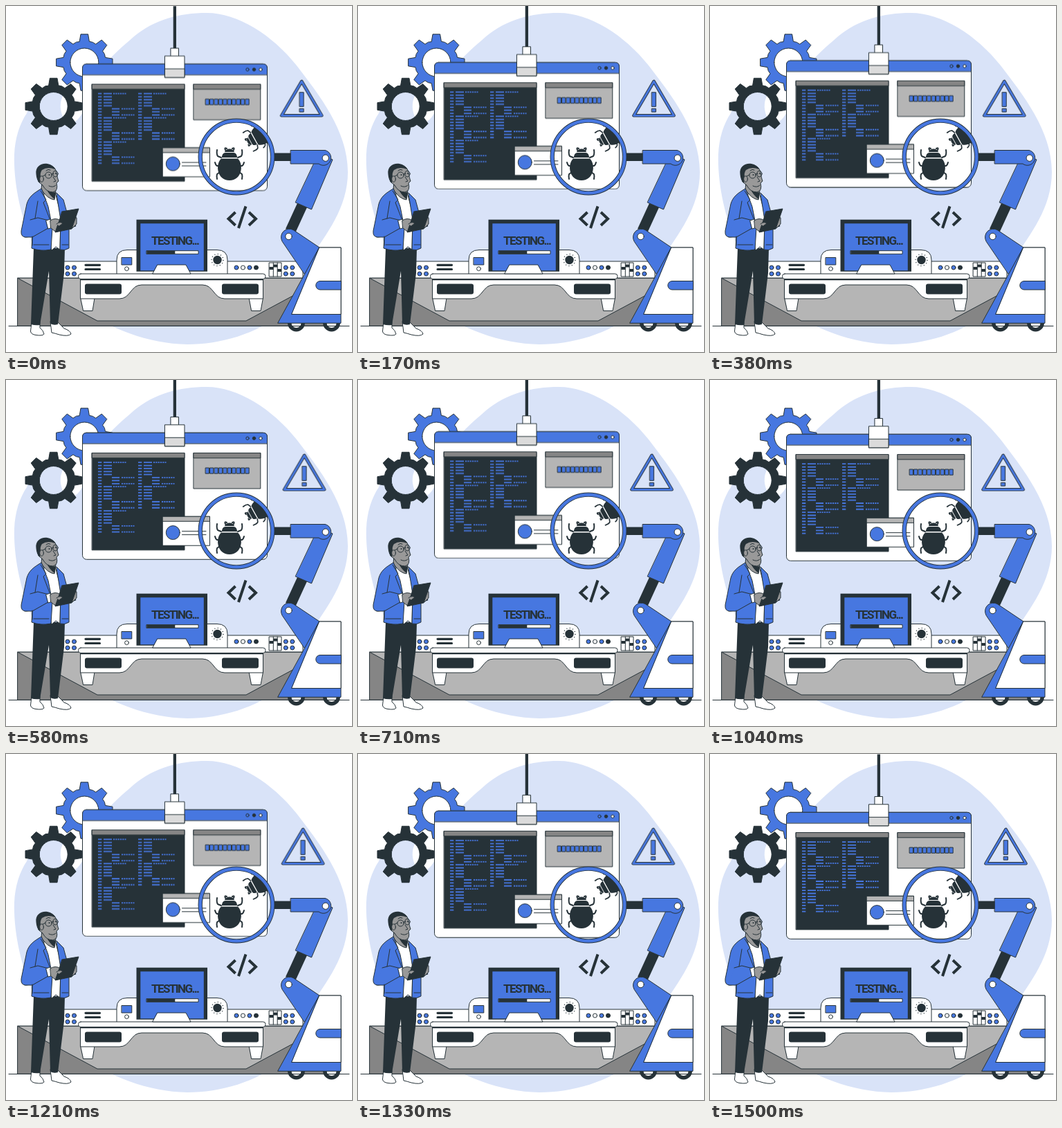
Recreate the animation shown at these times as an HTML page. Size 500 by 500 pixels, loop 1.54 s.

```html
<!DOCTYPE html>
<html lang="en">
<head>
<meta charset="utf-8">
<title>Testing</title>
<style>
html, body { margin: 0; width: 100%; height: 100%; overflow: hidden; background: #fff; }
svg { display: block; width: 100vw; height: 100vh; }
.o { stroke: #263238; stroke-width: 1; stroke-linejoin: round; stroke-linecap: round; }
.b { fill: #4777e0; }
.d { fill: #263238; }
.w { fill: #fff; }
.g { fill: #b5b5b5; }
.m { fill: #858585; }
.n { fill: none; }
.sky { fill: #d9e3f8; }
.skin { fill: #999; }
.leg { fill: none; stroke: #263238; stroke-width: 2; stroke-linecap: round; stroke-linejoin: round; }
.title { font: 700 17px Roboto, sans-serif; letter-spacing: -1.6px; }
</style>
</head>
<body>
<svg viewBox="0 0 500 500" xmlns="http://www.w3.org/2000/svg">
  <defs>
    <clipPath id="lens"><circle cx="333" cy="218" r="50"/></clipPath>
    <g id="bug">
      <path class="leg" d="M-6-24Q-8-28-4-26M6-24Q8-28 4-26M-12-13L-17-15Q-19-18-18-24M12-13L17-15Q19-18 18-24M-15-1H-18Q-20-2-21-6M15-1H18Q20-2 21-6M-14 8L-18 11Q-19 14-18 18M14 8L18 11Q19 14 18 18"/>
      <path class="d" d="M-7-21C-6-27 6-27 7-21ZM-11-13C-11-17-9-20-6-20H6C9-20 11-17 11-13ZM-12-11.500H12C21-3 18 20 0 20C-18 20-21-3-12-11.500Z"/>
    </g>
  </defs>

  <path class="sky" d="M12 215C13 190 20 170 30 155C40 130 55 119 68 119Q82 118 83 128Q74 145 84 164Q102 180 117 140C128 90 160 66 185 44C214 20 250 10 290 10C335 10 385 42 420 86C452 128 494 180 494 240C494 292 462 330 442 362C420 400 425 420 400 443C362 474 310 489 262 489C205 488 150 466 105 435C45 390 10 290 12 215Z"/>
  <g id="gears"></g>

  <g id="rig">
    <rect class="w o" x="110.5" y="84.3" width="267" height="183" rx="6"/>
    <path class="b o" d="M110.5 99.7V90.3Q110.5 84.3 116.5 84.3H371.5Q377.5 84.3 377.5 90.3V99.7Z"/>
    <circle class="b o" cx="349" cy="92.3" r="2.2"/>
    <circle class="d o" cx="358.5" cy="92.3" r="2.2"/>
    <circle class="w o" cx="368" cy="92.3" r="2.2"/>
    <rect class="d o" x="124.5" y="113.5" width="133.5" height="140.3"/>
    <rect class="m o" x="124.5" y="113.5" width="133.5" height="7.3"/>
    <g id="code" fill="none" stroke="#4777e0" stroke-width="1.8"></g>
    <rect class="g o" x="271.3" y="113.5" width="96.5" height="51.5"/>
    <rect class="m o" x="271.3" y="113.5" width="96.5" height="7.3"/>
    <g id="blocks" class="b o"></g>
    <rect class="w o" x="226.5" y="205.3" width="68" height="42"/>
    <rect class="g o" x="226.5" y="205.3" width="68" height="7"/>
    <circle class="b o" cx="241.3" cy="228.6" r="10"/>
    <path class="n o" d="M254.5 226.6H289M254.5 231.6H289"/>
    <rect class="d" x="241.7" y=".5" width="4.3" height="62"/>
    <rect class="w o" x="238.3" y="61.5" width="11.2" height="12"/>
    <rect class="w o" x="229.8" y="72.8" width="28.2" height="31"/>
    <rect class="o" fill="#dbdbdb" x="229.8" y="91.3" width="28.2" height="12.5"/>
  </g>

  <g id="sign">
    <path class="sky" d="M427.5 109L398.5 158.3H456.5Z"/>
    <path class="n" stroke="#263238" stroke-width="4.6" stroke-linejoin="round" d="M427.5 109L398.5 158.3H456.5Z"/>
    <path class="n" stroke="#4777e0" stroke-width="2.8" stroke-linejoin="round" d="M427.5 109L398.5 158.3H456.5Z"/>
    <rect class="b o" x="424.6" y="124.8" width="5.8" height="20.5"/>
    <rect class="b o" x="424.6" y="148.3" width="5.8" height="4.8"/>
  </g>

  <path class="n" stroke="#263238" stroke-width="4" d="M331.5 298L321.5 307.5L331.5 317M346.5 289.5L336 321M351 298L361 307.5L351 317"/>

  <!-- platform and consoles -->
  <path class="m o" d="M17 393.3H462V462.3H17Z"/>
  <path class="g o" d="M17 393.3L132 455H347L462 393.3Z"/>
  <rect class="w o" x="58" y="369" width="102.5" height="24"/>
  <rect class="w o" x="319" y="369" width="110" height="24"/>
  <path stroke="#263238" stroke-width="3.2" stroke-linecap="round" d="M115 374.3H135.5M115 380.5H135.5"/>
  <path class="w o" d="M160 388V367Q160 352.5 175 352.5H305Q320 352.5 320 367V388Z"/>
  <rect class="b o" x="167.3" y="363.5" width="14.5" height="10.5"/>
  <circle class="w o" cx="174.5" cy="379.7" r="2.9"/>
  <circle class="n" cx="305.5" cy="367" r="8.5" stroke="#263238" stroke-width="1.5" stroke-dasharray="1 3.45"/>
  <circle class="d" cx="305.5" cy="367" r="6.2"/>
  <g id="knobs"></g>
  <path class="w o" d="M380.5 371H398V391H380.5ZM386.3 371V391M392.2 371V391"/>
  <path class="d" d="M380.5 377H386.3V381H380.5ZM386.3 373.5H392.2V377.5H386.3ZM392.2 380H398V384H392.2Z"/>

  <!-- desk and monitor -->
  <path class="w o" d="M108 422H128L125 440.5H112ZM351.5 422H371.5L368 440.5H355Z"/>
  <path class="w o" d="M107.5 394V423H164C180 423 180 403 196 403H284C300 403 300 423 316 423H371.5V394Z"/>
  <rect class="d" x="107.5" y="394.5" width="264" height="1.8"/>
  <rect class="d" x="114" y="401.5" width="53" height="15" rx="3"/>
  <rect class="d" x="312" y="401.5" width="53" height="15" rx="3"/>
  <rect class="w o" x="104.5" y="387" width="270.5" height="7.5" rx="3.5"/>
  <rect class="d" x="188.5" y="308.7" width="102.5" height="75"/>
  <rect class="b" x="194.3" y="314.3" width="91.5" height="68"/>
  <path class="w o" d="M219 374H260L267 387H212Z"/>
  <text class="d title" x="210" y="344.7">TESTING...</text>
  <rect class="w o" x="203.3" y="353.7" width="74.7" height="4.6"/>
  <rect class="d" x="203.3" y="353.7" width="41" height="4.6"/>

  <!-- magnifier -->
  <g clip-path="url(#lens)">
    <use href="#bug" transform="translate(323 232)"/>
    <use href="#bug" transform="translate(368 186.5) rotate(-119) scale(.85)"/>
  </g>
  <rect class="d" x="386" y="212.5" width="27" height="11.5"/>
  <circle class="n" cx="333" cy="218" r="52.3" stroke="#263238" stroke-width="6.3"/>
  <circle class="n" cx="333" cy="218" r="52.3" stroke="#4777e0" stroke-width="4.5"/>

  <!-- robot arm -->
  <path class="d" d="M421 285L435 291L418 328L404 322Z"/>
  <path class="b o" d="M452 213L472 222L441.5 294L418.5 284Z"/>
  <path class="b o" d="M411.5 208.5H461A11 11 0 1 1 452 228H411.5Z"/>
  <circle class="w o" cx="461.8" cy="219.7" r="4.7"/>
  <circle class="d" cx="419.5" cy="458" r="12.5"/><circle class="w" cx="419.5" cy="458" r="7"/>
  <circle class="d" cx="470.5" cy="458" r="12.5"/><circle class="w" cx="470.5" cy="458" r="7"/>
  <path class="b o" d="M399 340A12 12 0 0 1 415 323.5L453 349L434 391Z"/>
  <circle class="w o" cx="408.5" cy="333" r="4.7"/>
  <path class="b o" d="M453 349H484V458.3H393Z"/>
  <path class="w o" d="M453 349H484V445.5H413Z"/>
  <path class="b o" d="M484 397.5H454A6.2 6.2 0 0 0 454 410H484Z"/>

  <path class="n o" d="M4 462.5H496"/>

  <!-- tester -->
  <path class="w o" d="M37 457L35.5 470Q36 474.5 43 475.5Q53 477 55 474Q54 469 49 465V457ZM64 456L66 472Q71 473 77 475Q90 478 94 474Q93 469 84 466L75 457Z"/>
  <path class="d" d="M40 350H85L84 386L75 460Q69 462 64 459L62 383L49 461Q42 462 36 460L38 405Z"/>
  <path class="w o" d="M52 273L70 266L79 300L78 352L72 348L66 353Z"/>
  <path class="skin o" d="M52 254L51 265Q60 279 70 280L72 266Z"/>
  <path class="d" d="M57 262Q64 271 72 269L70 279Q62 273 57 262Z"/>
  <path class="b o" d="M51 264C39 271 33 276 30 286L22 325Q21 334 29 334L38 333L37 350Q50 355 65 352L67 320L61 290Z"/>
  <path class="b o" d="M73 270L83 280L89 302L91 322V350Q85 354 78 352L79 310Z"/>
  <path class="b o" d="M35 309L46 306L62 310L61 321L38 334H27"/>
  <path class="n o" d="M46 282L42 307M50 267L58 280L54 284L66 315M38 333V346M40 345H62M81 345H90"/>
  <path class="b o" d="M86 323L101 318L97 310L84 314Z"/>
  <path class="w o" d="M58 310L64 308L67 320L61 322Z"/>
  <path class="skin o" d="M64 310Q71 305 79 310L82 315L76 317L79 321Q76 328 70 325L65 321Z"/>
  <path class="skin o" d="M91 309Q98 302 102 306V315L96 321L90 318Z"/>
  <path class="d o" d="M81 297L105 293L95 322L71 327L77 310Z"/>
  <path class="skin o" d="M73 315Q78 311 82 314L77 318"/>
  <path class="skin o" d="M45 242C48 230 64 227 70 234C74 239 73 245 76 253L73 256Q76 267 68 269Q58 269 53 259L47 254Z"/>
  <path class="d" d="M43.5 243C42 232 51 226.500 60 228Q68 229.500 71 236Q60 231.500 52 237Q49 241 50 247L49 256Q44 252 43.5 243Z"/>
  <ellipse class="skin o" cx="51.5" cy="250" rx="2.8" ry="4.2"/>
  <path class="n o" d="M53 246L57 244M66 243L69 242M58 238Q61 235 64 237M68 247L72 253L69 254M62 260Q68 263 72 259"/>
  <ellipse class="n o" cx="61.5" cy="244.5" rx="4.7" ry="4.5"/>
  <ellipse class="n o" cx="71.5" cy="242.5" rx="3.6" ry="4.3"/>
  <circle class="d" cx="62.5" cy="244" r="1"/><circle class="d" cx="72" cy="242" r="1"/>
</svg>
<script>
const $ = id => document.getElementById(id);

function gear(cx, cy, cls) {
  const pt = (r, a) => `${(cx + r * Math.sin(a)).toFixed(1)} ${(cy - r * Math.cos(a)).toFixed(1)}`;
  const rim = [];
  for (let i = 0; i < 8; i++) {
    const a = i * Math.PI / 4;
    rim.push(pt(31, a - .23), pt(41, a - .13), pt(41, a + .13), pt(31, a + .23), pt(31.5, a + Math.PI / 8));
  }
  const hole = `M${cx - 20.5} ${cy}a20.5 20.5 0 1 0 41 0a20.5 20.5 0 1 0 -41 0Z`;
  return `<path class="${cls} o" fill-rule="evenodd" d="M${rim.join('L')}Z${hole}"/>`;
}
$('gears').innerHTML = gear(113.3, 81.5, 'b') + gear(68.7, 145, 'd');

// Listing: five plain rows, then three indented ones
function listing(x, rows) {
  let solid = '', dots = '';
  for (let i = 0; i < rows; i++) {
    const k = i % 8, y = (127.2 + i * 4.37).toFixed(2);
    const dx = k < 5 ? 8 : 20;
    solid += `M${x} ${y}h5.3M${x + dx} ${y}h${k < 5 ? 12 : 11}`;
    if (k % 5 === 0 || k === 7) dots += `M${x + dx + 14} ${y}h18.5`;
  }
  return `<path d="${solid}"/><path stroke-dasharray="2.2 1.1" d="${dots}"/>`;
}
$('code').innerHTML = listing(133, 24) + listing(191, 16);

$('blocks').innerHTML = Array.from({ length: 10 }, (_, i) =>
  `<rect x="${288.5 + i * 6.42}" y="135" width="4.9" height="8.2"/>`).join('');

const knob = (x, y, cls) => `<circle class="${cls} o" cx="${x}" cy="${y}" r="3"/>`;
const quad = x => [0, 9.5].map(dx => knob(x + dx, 378, 'b') + knob(x + dx, 387, 'b')).join('');
$('knobs').innerHTML = quad(89) + quad(404.3) +
  ['b', 'w', 'b', 'd'].map((cls, i) => knob(333 + i * 9.5, 378, cls)).join('');

// Both moves tick at 24 fps
const timing = { duration: 1540, delay: -5, iterations: Infinity, easing: 'steps(37, start)' };
const play = (id, axis, steps) => $(id).animate(
  steps.map(v => ({ transform: `translate${axis}(${v}px)` })), timing);

play('rig', 'Y', [0, -10, 0]);
play('sign', 'X', [0, -1, 2, -4, 4, -4, 4, -4, 2, -1, 0]);
</script>
</body>
</html>
```
